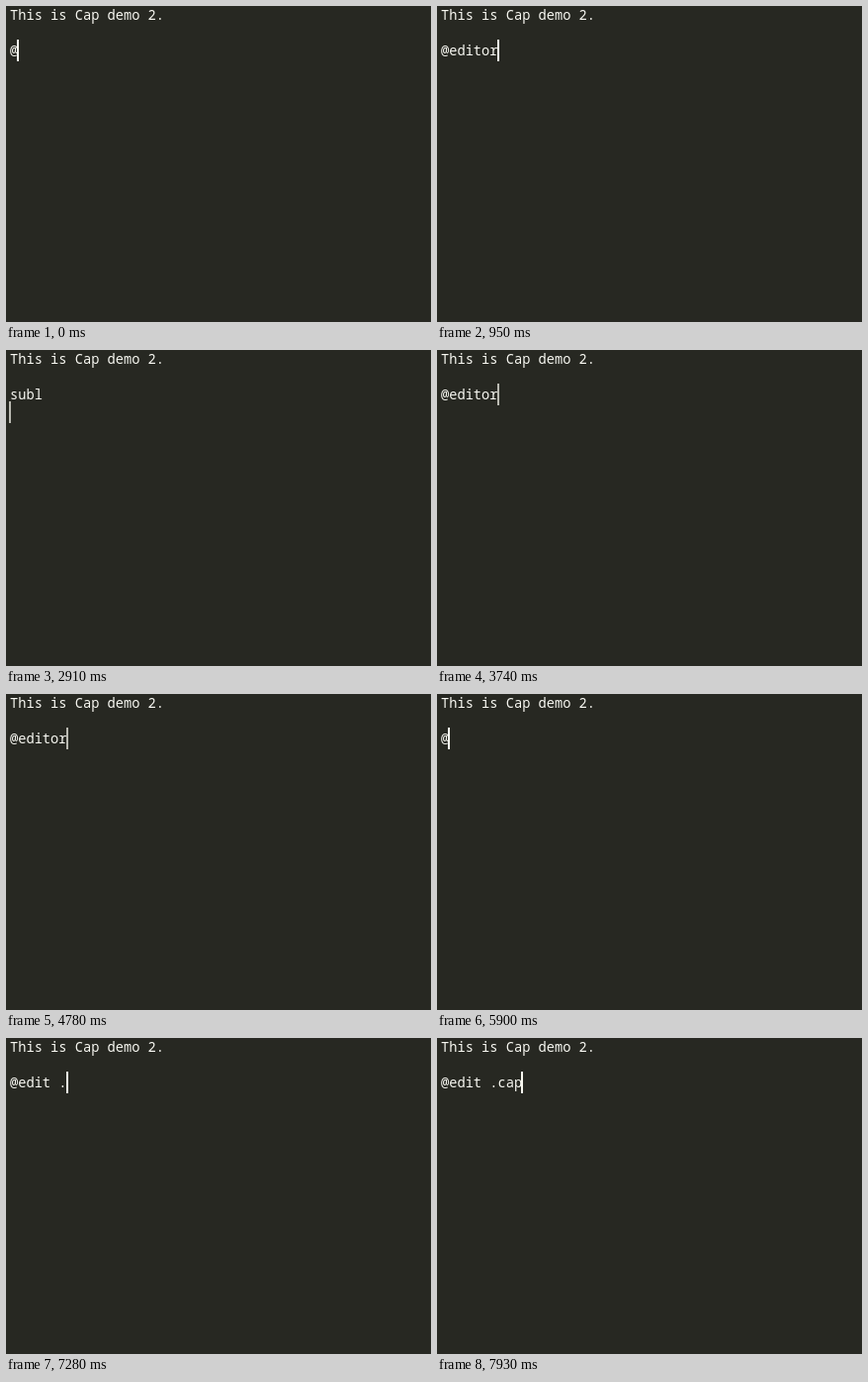
Recreate the animation shown at these times as an HTML page. Size 430x320 px, loop 8 s.

```html
<!DOCTYPE html>
<html lang="en">
<head>
<meta charset="utf-8">
<style>
  html, body { margin: 0; width: 100%; height: 100%; overflow: hidden; background: #272822; }
  svg { display: block; }
  text { font: 13.7px "Noto Sans Mono", monospace; fill: #f8f8f2; white-space: pre; }
</style>
</head>
<body>
<svg width="430" height="320">
  <text x="4" y="14">This is Cap demo 2.</text>
  <text id="line" x="4" y="50"></text>
  <rect id="caret" width="2" height="22" fill="#f8f8f0"/>
</svg>
<script>
const LOOP = 8000, ADVANCE = 8.23, LINE_HEIGHT = 18, DIM = 0.7;
const line = document.getElementById("line");
const caret = document.getElementById("caret");

// Each step: start time, editor text, caret opacity
const steps = [];
const show = (time, text, opacity = 1) => steps.push({ time, text, opacity });

function type(prefix, letters, start, interval) {
  [...letters].forEach((_, i) =>
    show(start + i * interval, prefix + letters.slice(0, i + 1)));
}

function blink(text, ...levels) {
  levels.forEach(([time, opacity]) => show(time, text, opacity));
}

show(0, "@");
type("@", "editor", 140, 162);
blink("@editor", [1320, DIM]);
show(1440, "subl\n");
blink("subl\n", [1840, DIM], [1990, 0], [2420, DIM], [2540, 1], [2910, DIM], [3060, 0]);
show(3310, "@editor");
blink("@editor", [3740, DIM], [3890, 0], [4380, DIM], [4500, 1], [4780, DIM], [4930, 0],
  [5360, 0.4], [5490, DIM], [5630, 1]);
show(5900, "@");
type("@", "edit", 6180, 520 / 3);
show(6980, "@edit ");
show(7280, "@edit .");
show(7680, "@edit .ca");
show(7930, "@edit .cap");

function render(now) {
  const time = now % LOOP;
  const { text, opacity } = steps.findLast(step => step.time <= time + 0.01);
  const rows = text.split("\n");
  const column = rows[rows.length - 1].length;
  line.textContent = rows[0];
  caret.setAttribute("x", 3 + Math.round(column * ADVANCE));
  caret.setAttribute("y", 34 + (rows.length - 1) * LINE_HEIGHT);
  caret.setAttribute("opacity", opacity);
}

function tick() {
  render(performance.now());
  requestAnimationFrame(tick);
}
tick();
</script>
</body>
</html>
```
